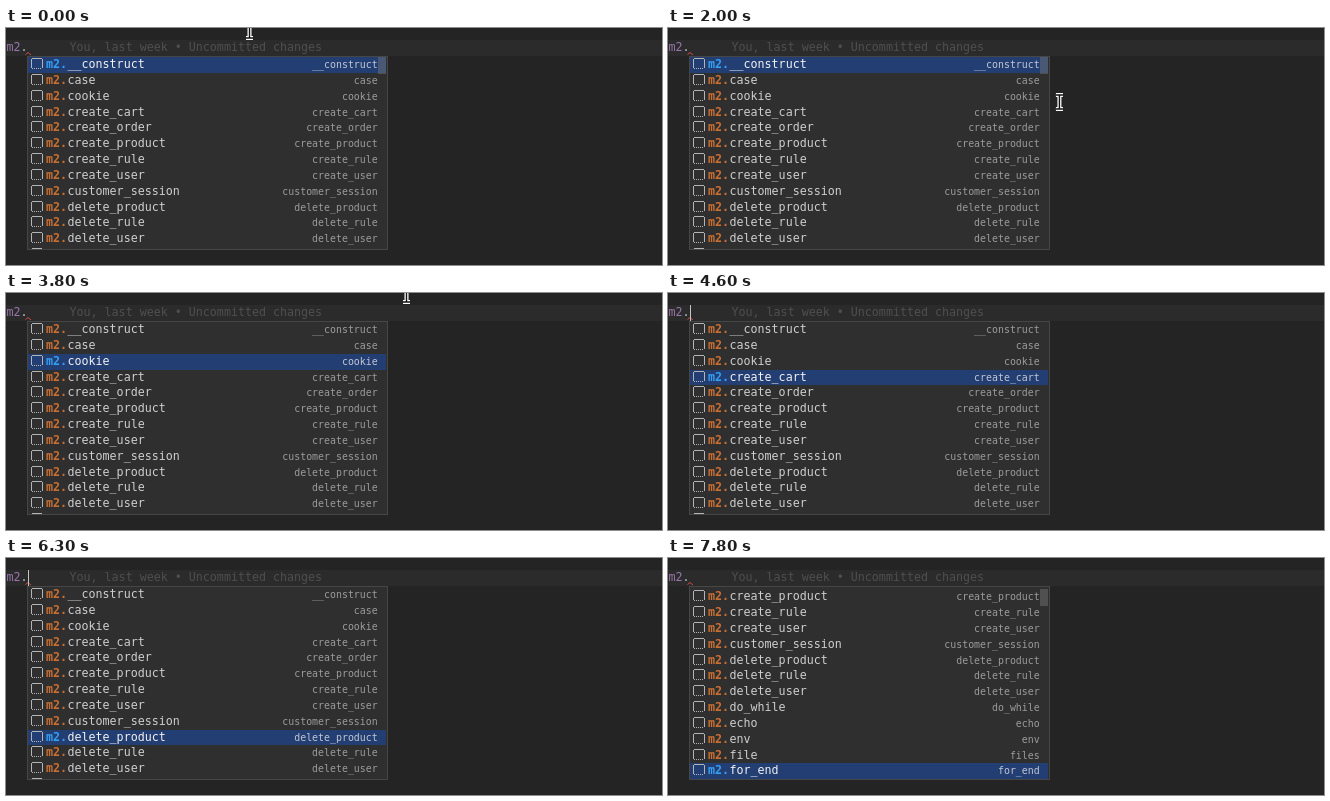
Recreate the animation shown at these times as an HTML page with a canvas. Size 656 by 237 pixels, loop 8 s.

```html
<!DOCTYPE html>
<html lang="en">
<head>
<meta charset="utf-8">
<title>Snippet completion list</title>
<style>
html, body { margin: 0; width: 656px; height: 237px; overflow: hidden; background: #242424; }
canvas { display: block; }
</style>
</head>
<body>
<canvas id="stage" width="656" height="237"></canvas>
<script>
const ctx = document.getElementById('stage').getContext('2d');
const LOOP = 8000, TICK = 100, ZOOM = 1 / 1.2;
const TOP = 29, PITCH = 19 * ZOOM, VIEW = 192.2;
const MONO = '"DejaVu Sans Mono", monospace';
const CODE = `${14 * ZOOM}px ${MONO}`, BOLD = `bold ${CODE}`, SMALL = `${11.9 * ZOOM}px ${MONO}`;

const items = ('__construct case cookie create_cart create_order create_product create_rule ' +
  'create_user customer_session delete_product delete_rule delete_user do_while echo env file for_end').split(' ');
const details = { file: 'files' };

const clamp = v => Math.min(1, Math.max(0, v));

// Single presses of "arrow down", then the key repeats every 200 ms
function selectedAt(t) {
  const single = [2600, 3100, 4600, 5000].filter(p => p <= t).length;
  const repeats = Math.max(0, Math.floor((t - 5300) / 200));
  return Math.min(items.length - 1, single + repeats);
}

// Shown while the pointer is over the list or the list scrolls, then fades
function barAlpha(t) {
  if (t >= 6900) return 1;
  const fadeStart = t < 1300 ? 500 : 2400;
  return clamp(1 - (t - fadeStart) / 400);
}

function bezier(p, a, b, c, d) {
  const q = 1 - p;
  return a.map((v, i) => q * q * q * v + 3 * q * q * p * b[i] + 3 * q * p * p * c[i] + p * p * p * d[i]);
}

// Rests at the top, comes down beside the list, then swings back up
function pointerAt(t) {
  const rest = [387, 112];
  if (t < 200) return [243.5, 3];
  if (t < 1200 || t >= 4000) return null;
  if (t < 1900) return bezier(clamp((t - 1200) / 600), [312, 2], [330, 30], [370, 90], rest);
  return bezier(clamp((t - 1900) / 500), rest, [385, 41], [440, 10], [400.5, 2]);
}

function rect(x, y, w, h, color) {
  ctx.fillStyle = color;
  ctx.fillRect(x, y, w, h);
}

function text(str, x, y, font, color, align = 'left') {
  ctx.font = font;
  ctx.fillStyle = color;
  ctx.textAlign = align;
  ctx.fillText(str, x, y);
}

function icon(x, y) {
  const color = '#b4b4b4';
  rect(x + 1, y, 10, 1, color);
  rect(x, y + 1, 1, 9, color);
  rect(x + 11, y + 1, 1, 9, color);
  for (let i = 1; i < 11; i += 2) rect(x + i, y + 10, 1, 1, color);
}

function editor(caretOn) {
  rect(0, 0, 656, 237, '#242424');
  rect(0, 12, 656, 16, '#2b2b2b');
  text('m2', 0.5, 23, CODE, '#9876aa');
  text('.', 14.5, 23, CODE, '#b4bcc6');
  text('You, last week • Uncommitted changes', 63.5, 23, CODE, '#4f4f4f');
  ctx.strokeStyle = '#d04a45';
  ctx.lineWidth = 1;
  ctx.beginPath();
  ctx.moveTo(19.5, 26.5);
  ctx.lineTo(22, 24.5);
  ctx.lineTo(25, 27);
  ctx.stroke();
  if (caretOn) rect(22, 12, 1, 16, '#c4c4c4');
}

function row(i, y, selected) {
  const edge = Math.round(y);
  if (selected) rect(22, edge, 358, Math.round(y + PITCH) - edge, '#223e73');
  const name = items[i], base = Math.round(y + 11.05);
  icon(25, Math.floor(y + 1.5));
  text('m2.', 40, base, BOLD, selected ? '#35a0f4' : '#cc7032');
  text(name, 61.5, base, CODE, selected ? '#f2f2f2' : '#cfcfcf');
  text(details[name] || name, 371.7, base, SMALL, selected ? '#c3c8d2' : '#9c9c9c', 'right');
}

function list(selected, alpha) {
  const scroll = Math.max(0, (selected + 1) * PITCH - VIEW);
  rect(21, 28, 361, 194, '#464646');
  rect(22, 29, 359, 192, '#2f2f2f');
  ctx.save();
  ctx.beginPath();
  ctx.rect(22, 29, 359, 192);
  ctx.clip();
  items.forEach((_, i) => {
    const y = TOP + i * PITCH - scroll;
    if (y > TOP - PITCH && y < TOP + VIEW) row(i, y, i === selected);
  });
  rect(372, TOP + Math.round(scroll / 50), 8, 17, `rgba(121,121,121,${0.45 * alpha})`);
  ctx.restore();
}

function pointer([x, y]) {
  ctx.save();
  ctx.translate(x, y);
  ctx.lineJoin = 'round';
  for (const [color, width] of [['#fff', 4], ['#111', 1.4]]) {
    ctx.strokeStyle = color;
    ctx.lineWidth = width;
    ctx.beginPath();
    for (const s of [-1, 1]) {
      ctx.moveTo(-3.5, s * 7);
      ctx.lineTo(3.5, s * 7);
    }
    ctx.moveTo(0, -7);
    ctx.lineTo(0, 7);
    ctx.stroke();
  }
  ctx.restore();
}

function draw(now) {
  const t = Math.floor((now % LOOP) / TICK) * TICK;
  const spot = pointerAt(t);
  editor((t + 700) % 1000 < 500);
  list(selectedAt(t), barAlpha(t));
  if (spot) pointer(spot);
}

const start = performance.now();
function loop() {
  draw(performance.now() - start);
  requestAnimationFrame(loop);
}
loop();
</script>
</body>
</html>
```
